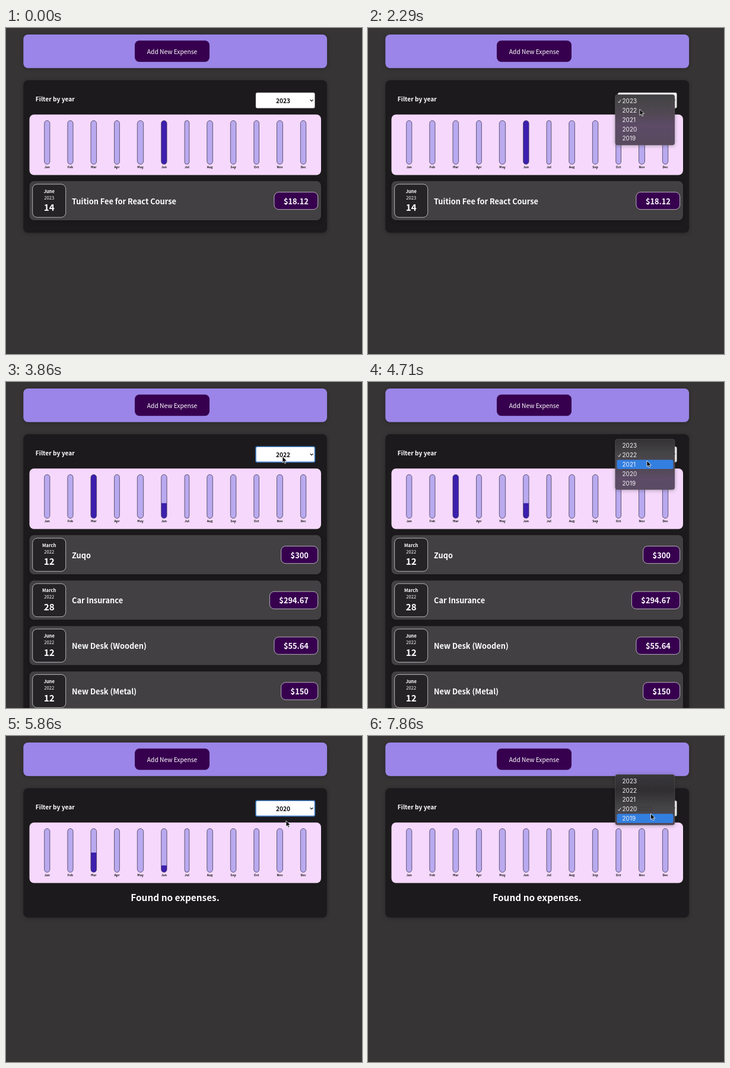
Recreate the animation shown at these times as an HTML page. Size 600 by 551 pixels, loop 8000 ms.

```html
<!DOCTYPE html>
<html lang="en">
<head>
<meta charset="utf-8">
<title>Expenses</title>
<style>
  html, body { margin: 0; width: 100%; height: 100%; overflow: hidden; background: #363435; }
  svg { display: block; width: 600px; height: 551px; }
  text { font-family: "Noto Sans CJK JP", "Noto Sans CJK SC", "Noto Sans CJK", "Noto Sans", sans-serif; font-weight: 700; }
  .shadow { filter: drop-shadow(0 1px 3px rgba(0, 0, 0, .28)); }
  .menu text { font-family: Inter, Roboto, sans-serif; font-weight: 400; }
</style>
</head>
<body>
<svg id="stage" viewBox="0 0 600 551">
  <defs>
    <linearGradient id="glass" gradientUnits="userSpaceOnUse" x1="0" y1="65" x2="0" y2="198">
      <stop offset="0" stop-color="#38373a"/>
      <stop offset=".2" stop-color="#302e31"/>
      <stop offset=".42" stop-color="#454446"/>
      <stop offset=".6" stop-color="#514854"/>
      <stop offset=".75" stop-color="#5d4b67"/>
      <stop offset="1" stop-color="#584a5e"/>
    </linearGradient>
  </defs>
</svg>
<script>
const NS = 'http://www.w3.org/2000/svg';
const stage = document.getElementById('stage');
const REM = 10.24, RADIUS = 7.7, PITCH = 76.8, ROW = 15.8;
const FPS = 7, LOOP = 8000;

function add(parent, tag, attrs, content) {
  const node = document.createElementNS(NS, tag);
  for (const name in attrs) node.setAttribute(name, attrs[name]);
  if (content !== undefined) node.textContent = content;
  return parent.appendChild(node);
}
const box = (parent, x, y, width, height, rx, fill, more) =>
  add(parent, 'rect', { x, y, width, height, rx, fill, ...more });
const label = (parent, content, x, y, rem, more) =>
  add(parent, 'text', { x, y, 'font-size': rem * REM, fill: '#fff', ...more }, content);
const group = (parent = stage, more) => add(parent, 'g', more);
const show = (node, on) => node.setAttribute('display', on ? 'inline' : 'none');
const middle = { 'text-anchor': 'middle' };
const outline = { stroke: '#ececec', 'stroke-width': .7 };

// Page header
box(stage, 29.3, 11, 511.8, 56.7, RADIUS, '#9b85e8', { class: 'shadow' });
box(stage, 217, 21.2, 126, 36, RADIUS, '#37004f');
label(stage, 'Add New Expense', 280, 43.8, 1, { ...middle, 'font-weight': 400, style: 'font-weight:400' });

// Expenses panel and year filter
const panel = box(stage, 29.3, 88.2, 511.8, 258, RADIUS, '#1c1a1c', { class: 'shadow' });
label(stage, 'Filter by year', 49.8, 124, 1);
const select = box(stage, 421, 109.2, 99.5, 26.2, 2.5, '#fff');
const selected = label(stage, '', 467, 126.8, 1, { ...middle, fill: '#0c0c0c' });
add(stage, 'path', { d: 'M512.6 121.2l2.5 2.5l2.5-2.5', fill: 'none', stroke: '#111', 'stroke-width': 1.2 });

// Chart: columns are as wide as their labels, spread evenly
box(stage, 39.5, 146.3, 491.5, 102.2, RADIUS, '#f5d8fc');
const BAR = { top: 156.5, height: 73.8 };
const months = 'Jan Feb Mar Apr May Jun Jul Aug Sep Oct Nov Dec'.split(' ')
  .map(name => label(stage, name, 0, 236.9, .5, { fill: '#111' }));
const widths = months.map(node => node.getComputedTextLength());
const gap = (471 - widths.reduce((a, b) => a + b)) / 12;
let left = 49.7 + gap / 2;
const fills = months.map((node, i) => {
  const width = widths[i], shape = [left, BAR.top, width, BAR.height, width / 2];
  node.setAttribute('x', left);
  box(add(stage, 'clipPath', { id: 'bar' + i }), ...shape, '#000');
  box(stage, ...shape, '#b9a9ef');
  const fill = box(stage, left, BAR.top, width, 0, 0, '#3c1fae', { 'clip-path': `url(#bar${i})` });
  box(stage, ...shape, 'none', { stroke: '#39324a', 'stroke-width': .75 });
  left += width + gap;
  return fill;
});

// Expense lists
function expense(list, index, [month, day, title, price], year) {
  const g = group(list, { transform: `translate(0 ${index * PITCH})` });
  box(g, 39.5, 258.8, 491.5, 66.2, RADIUS, '#424043', { class: 'shadow' });
  box(g, 44.7, 264, 56, 56, RADIUS, '#252326', outline);
  label(g, month, 72.7, 278.6, .75, middle);
  label(g, year, 72.7, 289.6, .75, { ...middle, style: 'font-weight:400' });
  label(g, day, 72.7, 309.3, 1.5, middle);
  label(g, title, 111, 297.6, 1.25);
  const badge = box(g, 0, 277.4, 0, 29.3, RADIUS, '#37004f', outline);
  const text = label(g, price, 509.8, 297.6, 1.25, { 'text-anchor': 'end' });
  const width = text.getComputedTextLength() + 3.1 * REM;
  badge.setAttribute('x', 525.6 - width);
  badge.setAttribute('width', width);
}
const expenses = {
  2023: [['June', 14, 'Tuition Fee for React Course', '$18.12']],
  2022: [
    ['March', 12, 'Zuqo', '$300'],
    ['March', 28, 'Car Insurance', '$294.67'],
    ['June', 12, 'New Desk (Wooden)', '$55.64'],
    ['June', 12, 'New Desk (Metal)', '$150'],
  ],
  2020: [],
};
const lists = {};
for (const year in expenses) {
  lists[year] = group();
  expenses[year].forEach((entry, i) => expense(lists[year], i, entry, year));
}
label(lists[2020], 'Found no expenses.', 285, 279, 1.5, middle);
const panelHeights = { 2023: 257.8, 2022: 600, 2020: 218.5 };

// Drop-down menu
const YEARS = [2023, 2022, 2021, 2020, 2019];
const menu = group(stage, { class: 'menu' });
const sheet = box(menu, 416.6, 0, 100.4, 85.5, 4, 'url(#glass)',
  { stroke: '#79757c', 'stroke-opacity': .6, 'stroke-width': .6, class: 'shadow' });
const ghost = add(menu, 'text', { x: 467, y: 126.8, 'font-size': REM, fill: '#222', opacity: .4, ...middle }, '2020');
const highlight = box(menu, 419.4, 0, 95, 15.6, 2.5, '#337fe0');
const options = YEARS.map(year => add(menu, 'text', { x: 428.5, 'font-size': 10, fill: '#f4f2f5' }, year));
add(menu, 'path', { d: 'M421.5 124.4l1.6 1.9l3-5', fill: 'none', stroke: '#f4f2f5', 'stroke-width': 1 });

const cursor = add(stage, 'path', {
  d: 'M0 0V10.2L2.4 8.1L4 11.7L5.7 11L4.1 7.4H7.4Z',
  fill: '#000', stroke: '#fff', 'stroke-width': .8, 'stroke-linejoin': 'round',
});

// Times below count screen ticks, seven per second
const path = [
  [1, 500, 268], [2, 486, 215], [3, 486, 215], [6, 468, 130], [8, 466, 126], [11, 463.3, 123],
  [14, 460, 136], [17, 457, 138], [19, 456, 131], [22, 459, 128], [27, 466, 126], [29, 467, 126],
  [33, 470, 133], [36, 470, 147], [38, 470, 149], [41, 472, 143], [43, 476, 160], [44, 480, 205],
  [45, 480, 205], [47, 477, 180], [49, 472, 126], [52, 474, 126], [55, 476.5, 131.2],
];
const menus = [
  { open: 9, close: 19, blink: 16 },
  { open: 29, close: 41, blink: 38 },
  { open: 50, close: 99 },
];

function pointer(tick) {
  const i = path.findIndex(point => point[0] >= tick);
  if (i <= 0) return path[0].slice(1);
  const [a, ax, ay] = path[i - 1], [b, bx, by] = path[i];
  const p = (tick - a) / (b - a);
  return [ax + (bx - ax) * p, ay + (by - ay) * p];
}

function easeOut(ms, start) {
  const u = Math.min(1, Math.max(0, (ms - start) / 300));
  return 1 - (1 - u) ** 1.7;
}

function setFill(index, share) {
  const height = BAR.height * share;
  fills[index].setAttribute('y', BAR.top + BAR.height - height);
  fills[index].setAttribute('height', height);
}

function drawMenu(tick, year, y) {
  const active = menus.find(m => tick >= m.open && tick < m.close);
  show(menu, active);
  if (!active) return;
  const top = 112.4 - ROW * YEARS.indexOf(year);
  const hover = Math.floor((y - top - 2.5) / ROW);
  sheet.setAttribute('y', top);
  options.forEach((node, i) => node.setAttribute('y', top + 14.7 + ROW * i));
  highlight.setAttribute('y', top + 3.3 + ROW * hover);
  show(highlight, hover >= 0 && hover < YEARS.length && tick !== active.blink);
  show(ghost, year === 2020);
  menu.setAttribute('opacity', tick === active.close - 1 ? .6 : 1);
}

function draw(time) {
  const tick = Math.floor((time % LOOP + 5) * FPS / 1000) % 56;
  const ms = tick * 1000 / FPS;
  const year = tick < 19 ? 2023 : tick < 41 ? 2022 : 2020;
  const [x, y] = pointer(tick);

  for (const key in lists) show(lists[key], +key === year);
  panel.setAttribute('height', panelHeights[year]);
  selected.textContent = year;

  const first = easeOut(ms, 2642), second = easeOut(ms, 5745);
  setFill(2, first * (1 - second));
  setFill(5, (1 - .654 * first) * (1 - second));

  drawMenu(tick, year, y);
  const focused = tick >= 19 && menu.getAttribute('display') === 'none';
  select.setAttribute('stroke', focused ? '#3f7cc4' : '#8a888b');
  select.setAttribute('stroke-width', focused ? 1.6 : .5);

  show(cursor, tick > 0);
  cursor.setAttribute('transform', `translate(${x} ${y})`);
}

const began = performance.now();
function loop() {
  draw(performance.now() - began);
  requestAnimationFrame(loop);
}
loop();
</script>
</body>
</html>
```
